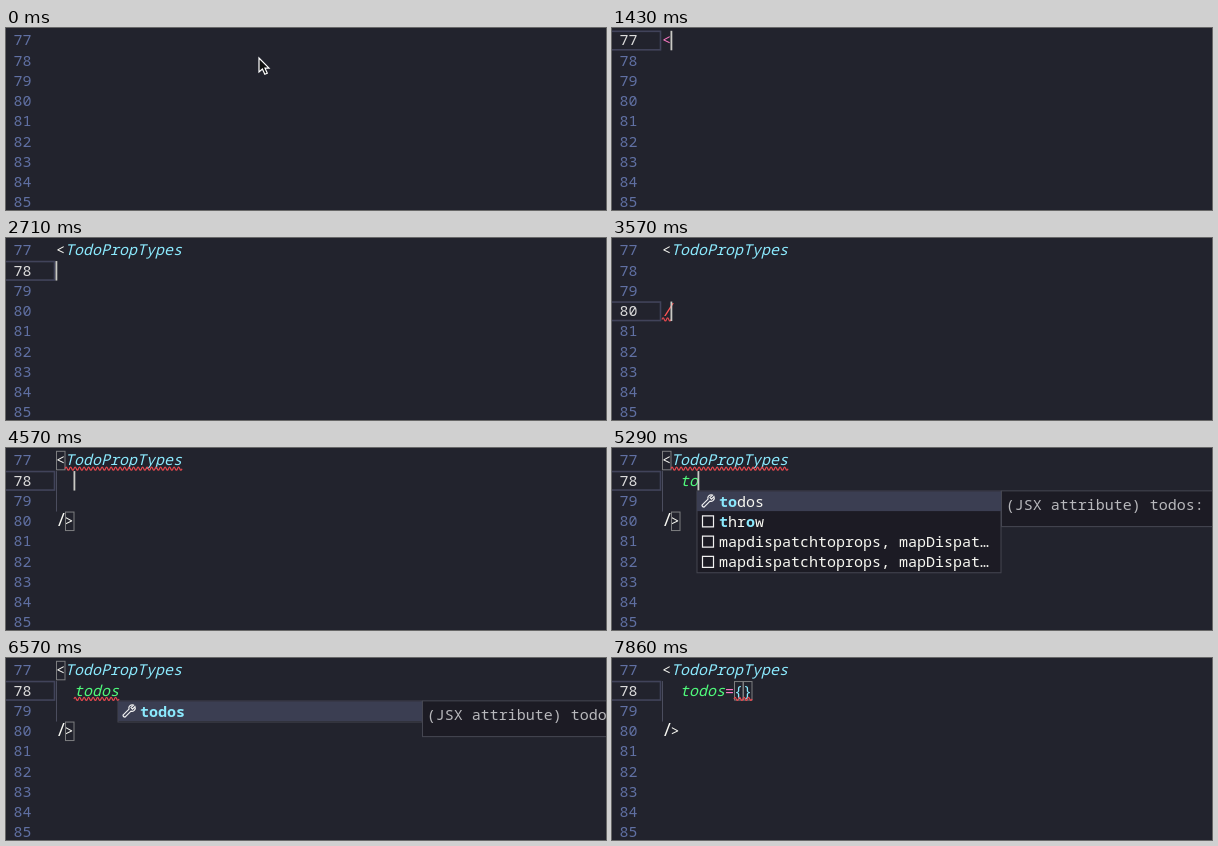
Animation of 600 by 182 pixels, one loop 8000 ms. Source, as an HTML page:

```html
<!DOCTYPE html>
<html lang="en">
<head>
<meta charset="utf-8">
<title>Editor autocomplete</title>
<style>
  html, body { margin: 0; width: 100%; height: 100%; overflow: hidden; background: #22232d; }
  svg { display: block; width: 600px; height: 182px; }
  text { font: 500 15px "Noto Sans Mono", "DejaVu Sans Mono", monospace; fill: #f8f8f2; white-space: pre; }
  .num { fill: #6070a3; }
  .active { fill: #dcdcdc; }
  .tag { fill: #8be9fd; font-style: italic; }
  .attr { fill: #50fa7b; font-style: italic; }
  .pink { fill: #ff79c6; }
  .cyan { fill: #8be9fd; }
  .red { fill: #ff5555; font-style: italic; }
  .slash { font-size: 18px; }
  .doc { fill: #b8b8bc; }
  .match { fill: #8be9fd; font-weight: bold; }
  .icon { fill: none; stroke: #f0f0f0; stroke-width: 1.2; }
  .cube { stroke: #b180d7; }
  .squiggle { fill: none; stroke: #e5484f; stroke-width: 1.2; }
  .bracket { fill: none; stroke: #7d7e80; }
  .panel { fill: #1c1b24; stroke: #454651; }
  .gutter { fill: none; stroke: #41435a; stroke-width: 1.6; }
</style>
</head>
<body>
<svg id="stage" viewBox="0 0 600 182"></svg>
<script>
const LOOP = 8000, BEATS = 56, ROW = 20.25, COL = 9, LEFT = 50, FIRST = 77;
// Beats at which the main actions happen
const FOCUS = 4, OPEN = 9, ACCEPT = 16, CLOSE = 26, ATTR = 32, VALUE = 49;
const stage = document.getElementById('stage');

const baseline = line => 17.3 + ROW * (line - FIRST);
const colX = col => LEFT + COL * col;
const text = (x, y, content, cls = '') => `<text x="${x}" y="${y}" class="${cls}">${content}</text>`;
const code = (line, col, content, cls) => text(colX(col), baseline(line), content, cls);
const rect = (x, y, w, h, attrs) => `<rect x="${x}" y="${y}" width="${w}" height="${h}" ${attrs}/>`;
const bracket = (line, col) => rect(colX(col) + 0.5, baseline(line) - 14, 8.5, 18.5, 'class="bracket"');
const squiggle = (line, col, count) =>
  `<path class="squiggle" d="M${colX(col)} ${baseline(line) + 3.4}q1.1-3 2.25 0${'t2.25 0'.repeat(count * 4 - 1)}"/>`;

const icons = {
  cube: '<path class="icon cube" d="M0-6L5.5-3.2V3L0 6-5.5 3V-3.2ZM-5.5-3.2L0 0 5.5-3.2M0 0V6"/>',
  value: '<path class="icon" d="M-6-4.5H6V4.5H-6ZM-3.5-1.5H3.5M-3.5 1.5H3.5"/>',
  wrench: '<path class="icon" d="M-6 4L0-2C-1-5 2-7 4.5-6L2-3.5 3.5-2 6-4.5C7-2 5 1 2 0L-4 6Q-6 6-6 4Z"/>',
  snippet: '<path class="icon" d="M-5.5-5.5H5.5V5.5H-5.5Z"/>'
};

// Keys of a burst follow each other every second beat.
const bursts = { [OPEN]: '<', [ACCEPT]: '⇥↵↵↵/>↑↑→todos', [VALUE]: '={' };
const tagName = 'TodoPropTypes', attrName = 'todos';

function press(caret, key, from) {
  const { line, col } = caret;
  switch (key) {
    case '⇥': return { from, line, col: col + tagName.length };
    case '↵': return { from, line: line + 1, col: 0 };
    case '↑': return { from, line: line - 1, col: 0 };
    case '→': return { from, line, col: 2 };
    default: return { from, line, col: col + 1 };
  }
}

const carets = [{ from: FOCUS, line: FIRST, col: 0 }];
for (const [start, keys] of Object.entries(bursts)) {
  [...keys].forEach((key, i) => carets.push(press(carets.at(-1), key, +start + 2 * i)));
}

// Suggestion list that follows the caret; items are [icon, label].
function popup({ line, col }, items, docLines) {
  const x = colX(col) - 1, y = baseline(line) + 5.5, width = 304, docX = x + width;
  const rows = items.map(([icon, label], i) => {
    const base = baseline(line + 1 + i) + 0.8;
    return `<g transform="translate(${x + 11} ${base - 5.5})">${icons[icon]}</g>` + text(x + 22, base, label);
  });
  const docs = docLines.map((content, i) => text(docX + 4.7, baseline(line + 1 + i) + 4.3, content, 'doc'));
  return rect(x, y, width, items.length * ROW + 0.7, 'class="panel"') +
    rect(x, y + 0.4, width, ROW - 0.6, 'fill="#3b3e52"') + rows.join('') +
    rect(docX + 0.5, y - 0.2, 260, docLines.length * ROW + 15.5, 'class="panel"') + docs.join('');
}

// Marks the letters of word inside label, or returns null if they are not all there.
function fuzzy(label, word) {
  let n = 0;
  const marked = [...label].map(c => c.toLowerCase() === word[n] && ++n ? `<tspan class="match">${c}</tspan>` : c);
  if (n < word.length) return null;
  return label[0] === word[0] ? marked.join('') : label;
}

const tagItems = [
  ['cube', tagName], ['value', 'TodoTitle'], ['value', 'TodoWrapper'],
  ...['a', 'abbr', 'address', 'animate', 'animateMotion'].map(name => ['wrench', name])
];
const mapSnippet = ['snippet', 'mapdispatchtoprops, mapDispat…'];
const attrItems = [['wrench', attrName], ['snippet', 'throw'], mapSnippet, mapSnippet];

function tagPopup(caret) {
  const x = colX(caret.col) - 1, y = baseline(caret.line) + 6;
  return popup(caret, tagItems, ['function TodoPropTypes(props:', 'Props): JSX.Element']) +
    rect(x + 293, y + 0.5, 10, ROW - 1, 'fill="#50515f"') +
    rect(x + 0.5, y + ROW, 303, ROW, 'fill="#f8f8f2" opacity=".05"');
}

function attrPopup(caret, word) {
  const items = attrItems.map(([icon, label]) => [icon, fuzzy(label, word)]).filter(item => item[1]);
  return popup(caret, items, ['(JSX attribute) todos: any']);
}

function pointer(beat) {
  const p = Math.max(0, (beat - 1) / 7), x = 253 - 80 * p, y = 30 + 20 * p - 30 * Math.sin(Math.PI * p);
  return `<path transform="translate(${x} ${y})" d="M0 0V14L3.4 11 5.8 16.3 8.3 15.2 6 10.2H10Z"
    fill="#111" stroke="#fff" stroke-width="1.2"/>`;
}

function render(beat) {
  const caret = carets.findLast(c => c.from <= beat);
  const word = attrName.slice(0, Math.max(0, Math.floor((beat - ATTR) / 2)));
  const during = (from, to, markup) => beat >= from && beat < to ? markup : '';
  const since = (from, markup) => during(from, BEATS, markup);
  let out = '', rowErrors = '';

  for (let n = FIRST; n < FIRST + 9; n++) {
    out += text(7.5, baseline(n), n, caret?.line === n ? 'active' : 'num');
    if (n > FIRST) rowErrors += squiggle(n, -0.1, 1);
  }
  if (caret) out += rect(-2, baseline(caret.line) - 14, 50.5, 18.5, 'class="gutter"');

  out += during(OPEN, ACCEPT, code(77, 0, '&lt;', 'pink')) +
    since(ACCEPT, code(77, 0, '&lt;') + code(77, 1, tagName, 'tag')) +
    during(CLOSE - 2, CLOSE, code(80, 0, '/', 'red slash') + squiggle(80, 0, 1)) +
    since(CLOSE, code(80, 0, '/', 'slash') + text(colX(1) - 0.5, baseline(80), '&gt;')) +
    since(CLOSE + 2, rect(LEFT, baseline(78) - 14.5, 1, 2 * ROW, 'fill="#4b4d5e"')) +
    during(CLOSE + 1, VALUE + 2, bracket(77, 0) + bracket(80, 1)) +
    during(ATTR - 2, ATTR + 6, squiggle(77, 1, tagName.length)) +
    code(78, 2, word, 'attr') +
    during(ATTR + 12, VALUE, squiggle(78, 2, attrName.length)) +
    since(VALUE, code(78, 7, '=', 'pink')) +
    since(VALUE + 2, code(78, 8, '{}', 'cyan') + bracket(78, 8) + bracket(78, 9)) +
    since(VALUE + 5, squiggle(78, 8, 2)) +
    during(ACCEPT - 2, ACCEPT, rowErrors);

  if (caret && (beat - caret.from) % 7 < 3) {
    out += rect(colX(caret.col) - 0.5, baseline(caret.line) - 14.5, 1.8, 19.5, 'fill="#c9c9c4"');
  }
  if (beat >= OPEN + 2 && beat < ACCEPT) out += tagPopup(caret);
  if (word.length > 1 && beat < VALUE - 2) out += attrPopup(caret, word);
  if (beat < OPEN) out += pointer(beat);
  stage.innerHTML = out;
}

const start = performance.now();
let shown = -1;
function frame() {
  const t = (performance.now() - start) % LOOP;
  // Beats fall on times rounded to 10 ms.
  const beat = Math.floor((t + 5) * BEATS / LOOP) % BEATS;
  if (beat !== shown) render(shown = beat);
  requestAnimationFrame(frame);
}
frame();
</script>
</body>
</html>
```
